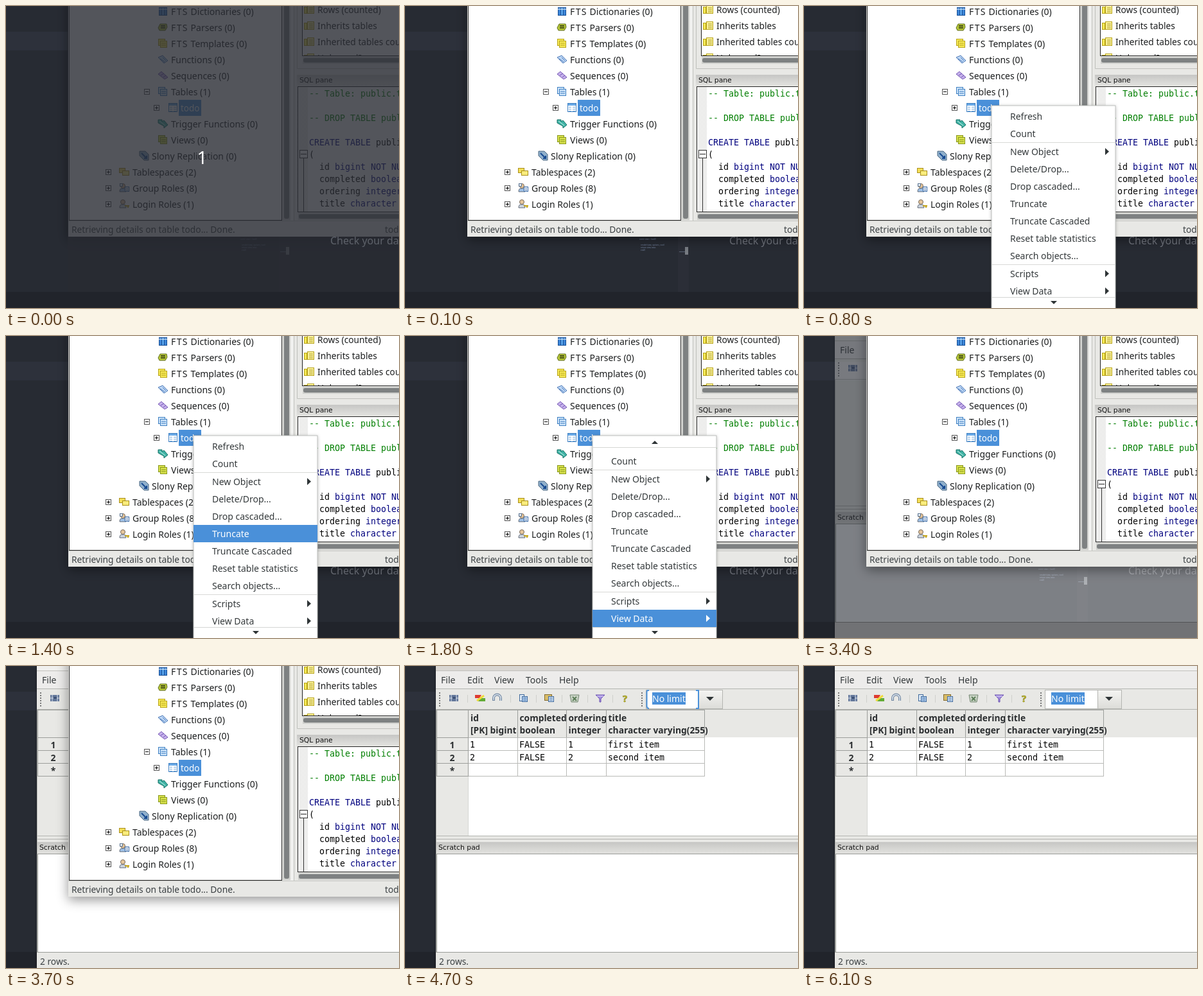
An HTML page that plays this animation: 612x470 px, repeating every 6200 ms.

```html
<!DOCTYPE html>
<html lang="en">
<head>
<meta charset="utf-8">
<title>Database table viewer</title>
<style>
html, body { margin: 0; width: 100%; height: 100%; overflow: hidden; background: #272a33; }
svg { display: block; width: 612px; height: 470px; }
text { font: 14px "Noto Sans", sans-serif; fill: #1c1e1f; white-space: pre; }
.menu { fill: #34393b; }
.bold { font-weight: 700; fill: #2b2e30; }
.mono { font: 13.3px "DejaVu Sans Mono", monospace; fill: #000; }
.label { font: 10.8px "DejaVu Sans", sans-serif; fill: #111; }
.status { font-size: 13.75px; fill: #3b4043; }
.fts { letter-spacing: 1.4px; }
.kw { fill: #00007f; }
.note { fill: #007f00; }
</style>
</head>
<body>
<svg id="stage" viewBox="0 0 612 470" xmlns="http://www.w3.org/2000/svg"></svg>
<script>
const LOOP = 6200;
const BLUE = '#4a90d9', PANEL = '#e8e8e5', LINE = '#b4b5b1';

const rect = (x, y, w, h, fill, extra = '') =>
  `<rect x="${x}" y="${y}" width="${w}" height="${h}" fill="${fill}" ${extra}/>`;
const box = (x, y, w, h, fill, stroke) =>
  rect(x + .5, y + .5, w - 1, h - 1, fill, `stroke="${stroke}"`);
const path = (d, fill, stroke = 'none', width = 1) =>
  `<path d="${d}" fill="${fill}" stroke="${stroke}" stroke-width="${width}"/>`;
const text = (x, y, str, cls = '', extra = '') =>
  `<text x="${x}" y="${y}" class="${cls}" ${extra}>${str}</text>`;
const group = (id, body, extra = '') => `<g id="${id}" ${extra}>${body}</g>`;
const at = (x, y, body) => `<g transform="translate(${x} ${y})">${body}</g>`;

// Small icons, drawn around their centre.
const pages = (fill, edge) => box(-7, -7, 11, 11, fill, edge) +
  box(-4, -4, 11, 11, fill, edge) + path('M-2 0H5M-2 3H5', 'none', edge);
const person = (shirt) => `<circle cx="-2" cy="-3" r="3.5" fill="#e6c69a" stroke="#776a5c"/>` +
  path('M-7 6Q-7 0-2 1Q3 0 3 6Z', shirt, '#606a78');
const icons = {
  books: box(-6, -6, 5, 13, '#3c86d8', '#174f96') + box(-2, -6, 5, 13, '#58a3ea', '#174f96') +
    box(2, -6, 5, 13, '#3c86d8', '#174f96') + path('M-6 -3H7', 'none', '#fff'),
  parser: path('M-7 1L-4 -5H6L7 0L4 5H-5Z', '#b8c83a', '#5c6a16') + path('M-3 -2H4M-3 1H4', 'none', '#444d14', 2),
  template: pages('#f7ea55', '#b7a31b'),
  func: path('M-7 -3L0 -6L8 2L2 6Z', '#bcd6f5', '#4b77b5') + path('M-4 -1L3 4M0 -3L5 2', 'none', '#4b77b5'),
  seq: path('M-7 -2L-2 -6L8 3L3 6Z', '#c6b2ec', '#7455b4') + path('M-3 0L2 -3M1 3L5 0', 'none', '#7455b4'),
  tables: pages('#cfe5fa', '#3e7fc1'),
  table: box(-7, -7, 14, 14, '#fff', '#3e7fc1') + rect(-6, -6, 12, 3, '#69a9e6') +
    path('M-5 -.5H-1M1 -.5H5M-5 2.5H-1M1 2.5H5M-5 5.5H-1M1 5.5H5', 'none', '#7eaedb'),
  trigger: path('M-7 -6H-1V-3L2 -5L8 2L2 7V4L-7 -1Z', '#3fb3a5', '#167166') + path('M-5 -4L4 3', 'none', '#c9f1ea'),
  views: pages('#d9e34d', '#87951c'),
  slony: path('M-7 -7H2L7 -2V7H0L-7 0Z', '#8fb0cc', '#4a6680') + path('M-4 -4L4 4M4 0V4H0', 'none', '#174a91', 2),
  folders: box(-8, -6, 10, 8, '#f4df58', '#a98f1c') + box(-3, -2, 11, 8, '#f9ec7c', '#a98f1c'),
  roles: person('#9ec1e8') + box(-7, -7, 5, 5, '#e9f0f8', '#58718f') + box(1, -2, 7, 8, '#fff', '#3567a5') +
    path('M3 1H6M3 3.500H6', 'none', '#3567a5'),
  login: person('#cfd6df') + path('M1 3H8M6 3V6', 'none', '#c3a41c', 2),
  list: box(-8, -5, 5, 11, '#f7ea55', '#b7a31b') + box(-3, -7, 11, 13, '#fbf29a', '#b7a31b') +
    path('M0 -3H6M0 0H6M0 3H6', 'none', '#a4921c'),
  save: rect(-7, -5, 14, 10, '#63779a') + path('M-4 -5V5M4 -5V5M-7 0H7', 'none', '#d5deea') + rect(-2, -2, 5, 3, '#3f5377'),
  reload: path('M-8 -5H2L-1 0H-8Z', '#dd3b31') + path('M8 5H-3L0 0H8Z', '#62ab35') + path('M-5 4L6 -4', 'none', '#f0dc39', 3),
  undo: path('M-6 4V0A5 5 0 0 1 5 0V4', 'none', '#7288a3', 4) + path('M-6 3V0A5 5 0 0 1 5 0V4', 'none', '#dfe7ef', 1.5),
  copy: box(-6, -6, 8, 11, '#dce9f6', '#40699b') + box(-2, -3, 9, 9, '#b1cff0', '#40699b') + path('M0 0H5M0 3H5', 'none', '#40699b'),
  paste: box(-7, -6, 12, 10, '#d9bd68', '#846b2e') + box(-1, -3, 9, 9, '#cfe2f6', '#40699b') + path('M1 0H6M1 3H6', 'none', '#40699b'),
  trash: path('M-7 -5H7L5 6H-5Z', '#c9d3c5', '#728670') + path('M-3 -2L3 4M3 -2L-3 4', 'none', '#5b7d58', 2),
  filter: path('M-7 -5H7L1 1V6H-1V1Z', '#a38ee0', '#6a52af') + path('M-5 -3H5', 'none', '#e3dbfb'),
  help: text(-4, 6, '?', '', 'style="font-weight:700;font-size:15px;fill:#c3bc20;stroke:#77731b;stroke-width:.5"')
};
const icon = (x, y, name) => at(x, y, icons[name]);
const toggle = (x, y, open) => box(x - 4, y - 4, 9, 9, '#fff', '#555') +
  path(`M${x - 2} ${y + .5}H${x + 3}` + (open ? '' : `M${x + .5} ${y - 2}V${y + 3}`), 'none', '#000');

function desktop() {
  const tiny = [[365, 364, 'const view = load()'], [367, 373, 'render(view, options, root)'],
    [367, 377, 'return view.rows'], [367, 381, 'end()']]
    .map(([x, y, s]) => text(x, y, s, '', 'style="font-size:3px;fill:#7887a5"')).join('');
  return rect(0, 0, 612, 470, '#272b33') + rect(0, 40, 97, 29, '#2d313b') +
    rect(425, 350, 17, 95, '#2b2e37') + rect(427, 382, 9, 1, '#596273') + rect(436, 375, 5, 12, '#777b82') +
    tiny + rect(0, 445, 612, 25, '#21242b');
}

function tree() {
  const rows = [
    [257, 244, 8, 'books', '<tspan class="fts">FTS</tspan> Dictionaries (0)'],
    [257, 244, 33, 'parser', '<tspan class="fts">FTS</tspan> Parsers (0)'],
    [257, 244, 58, 'template', '<tspan class="fts">FTS</tspan> Templates (0)'],
    [257, 244, 83, 'func', 'Functions (0)'], [257, 244, 108, 'seq', 'Sequences (0)'],
    [257, 244, 133, 'tables', 'Tables (1)'], [257, 244, 183, 'trigger', 'Trigger Functions (0)'],
    [257, 244, 208, 'views', 'Views (0)'], [227, 215, 233, 'slony', 'Slony Replication (0)'],
    [197, 184, 258, 'folders', 'Tablespaces (2)'], [197, 184, 283, 'roles', 'Group Roles (8)'],
    [197, 184, 308, 'login', 'Login Roles (1)']];
  return rows.map(([x, ix, y, name, s]) => icon(ix, y, name) + text(x, y + 5.5, s)).join('') +
    icon(260, 158, 'table') + rect(269, 146, 35, 25, BLUE) + text(272, 163.5, 'todo', '', 'style="fill:#fff;font-size:13.5px"') +
    toggle(219, 133, true) + [[234, 158], [159, 258], [159, 283], [159, 308]].map(p => toggle(...p)).join('');
}

function sqlPane() {
  const kw = s => `<tspan class="kw">${s}</tspan>`;
  const lines = [
    [472, 136, '-- Table: public.todo', 'note'], [472, 174, '-- DROP TABLE public.todo;', 'note'],
    [472, 212, kw('CREATE TABLE') + ' public.todo'], [472, 231, '('],
    [488, 250, 'id ' + kw('bigint NOT NULL')], [488, 269, 'completed ' + kw('boolean')],
    [488, 288, 'ordering ' + kw('integer')], [488, 307, 'title ' + kw('character varying')]];
  return rect(453, 107, 160, 17, 'url(#bar)') + text(457, 119, 'SQL pane', 'label') +
    box(454, 125, 170, 196, '#fff', '#222') + rect(456, 126, 14, 194, 'url(#hatch)') +
    path('M463.500 237V320', 'none', '#333') + box(457, 224, 13, 13, '#fff', '#333') + path('M459 230.500H468', 'none', '#222') +
    lines.map(([x, y, s, c = '']) => text(x, y + 4.500, s, 'mono ' + c)).join('') +
    rect(455, 322, 160, 11, '#cfd0cd') + rect(456, 324, 160, 7, '#7e8182', 'rx="3"');
}

function browser() {
  const list = ['Rows (counted)', 'Inherits tables', 'Inherited tables count', 'Unlogged?']
    .map((s, i) => icon(472, 6 + 25 * i, 'list') + text(485, 11 + 25 * i, s, '', 'style="font-size:13.75px"')).join('');
  return rect(97, -40, 560, 399, PANEL, 'filter="url(#shadow)"') +
    box(98, -5, 332, 339, '#fff', '#222') + tree() +
    rect(431, 0, 12, 333, '#cfd0cd') + rect(433, -5, 8, 336, '#7e8182', 'rx="3"') +
    rect(443, 0, 5, 335, '#f1f1ef') + path('M448.500 0V334M453.500 0V97.500H612', 'none', '#bfc0bc') +
    box(461, -5, 170, 83, '#fff', '#222') + `<g clip-path="url(#listClip)">${list}</g>` +
    rect(462, 79, 160, 11, '#cfd0cd') + rect(463, 81, 160, 7, '#7e8182', 'rx="3"') +
    sqlPane() + path('M97 334.500H612', 'none', '#c6c7c3') +
    text(102, 353, 'Retrieving details on table todo... Done.', 'status') + text(590, 353, 'todo', 'status');
}

function dataWindow() {
  const columns = [[98, 'id', '[PK] bigint', '1', '2'], [175, 'completed', 'boolean', 'FALSE', 'FALSE'],
    [251, 'ordering', 'integer', '1', '2'], [313, 'title', 'character varying(255)', 'first item', 'second item'], [466]];
  const grid = columns.slice(0, -1).map(([x, a, b, ...cells], i) => {
    const w = columns[i + 1][0] - x + 1, pad = x + (i === 0 ? 4 : 3.500);
    return box(x, 68, w, 44, PANEL, '#9c9e9b') + text(pad, 86, a, 'bold', 'style="font-size:13.8px"') +
      text(pad, 105, b, 'bold', 'style="font-size:13.8px"') +
      [0, 1, 2].map(r => box(x, 111 + 20 * r, w, 21, '#fff', '#b9bab7') +
        text(x + 3, 127 + 20 * r, cells[r] || '', 'mono')).join('');
  }).join('');
  const labels = ['1', '2', '*'].map((s, i) => box(49, 111 + 20 * i, 50, 21, PANEL, '#9c9e9b') +
    text(73.500, 127.500 + 20 * i, s, 'bold', 'text-anchor="middle"')).join('');
  const grip = x => path(`M${x} 41V63`, 'none', '#777', 2).replace('/>', ' stroke-dasharray="2 2"/>');
  const menus = [[56, 'File'], [97, 'Edit'], [139, 'View'], [188, 'Tools'], [240, 'Help']]
    .map(([x, s]) => text(x, 27, s, 'menu')).join('');
  const tools = [[76, 'save'], [117, 'reload'], [144, 'undo'], [184, 'copy'], [224, 'paste'],
    [264, 'trash'], [304, 'filter'], [343, 'help']].map(([x, n]) => icon(x, 50, n)).join('');
  const dividers = [97, 164, 204, 244, 284, 323].map(x => path(`M${x}.5 45V57`, 'none', '#cfd0cc')).join('');
  return rect(48, -40, 620, 560, PANEL, 'filter="url(#edge)"') +
    rect(48, 0, 564, 7, '#f0f0ee', 'id="titlebar"') + path('M48 7.500H612', 'none', '#c2c1bd') +
    rect(48, 8, 564, 27, '#edeceb') + menus + path('M48 35.500H612M48 67.500H612', 'none', LINE) +
    grip(54) + grip(369) + tools + dividers +
    box(375, 37, 120, 30, 'url(#button)', LINE) + rect(376, 38, 81, 28, '#fff') +
    rect(385, 41, 52, 19, BLUE) + text(385, 56, 'No limit', '', 'style="fill:#fff"') +
    path('M457.500 38V66', 'none', LINE) + path('M469 48H481L475 54Z', '#2e3436') +
    group('focus', path('M380 38H378Q376.500 38 376.500 41V62Q376.500 66 380 66M453 38H457V66H453', 'none', BLUE, 2)) +
    rect(98, 111, 514, 153, '#fff') + rect(49, 68, 49, 196, PANEL) + path('M98.500 171V264', 'none', '#d6d7d3') +
    group('rows', grid + labels + box(49, 68, 50, 44, PANEL, '#9c9e9b') + text(53, 465, '2 rows.', 'status')) +
    path('M48.500 68V446M48 264.500H612M48 269.500H612', 'none', LINE) +
    rect(49, 274, 563, 18, 'url(#bar)') + text(52, 286, 'Scratch pad', 'label') +
    box(49, 292, 580, 154, '#fff', '#999b97');
}

const ITEMS = ['Refresh', 'Count', 'New Object', 'Delete/Drop...', 'Drop cascaded...', 'Truncate', 'Truncate Cascaded',
  'Reset table statistics', 'Search objects...', 'Scripts', 'View Data', 'Reports'];
const PARENTS = [2, 9, 10, 11];

function contextMenu(scroll, hot) {
  const top = scroll ? 173 : 156;
  const items = ITEMS.map((s, i) => {
    const y = 158 + 27 * i + (i > 1) + (i > 8) - scroll, lit = i === hot, ink = lit ? '#fff' : '#2e3436';
    return (lit ? rect(292, y, 193, 27, BLUE) : '') +
      (i === 2 || i === 9 ? rect(292, y - 1, 193, 1, '#d8d9d7') : '') +
      text(321, y + 18.500, s, 'menu', lit ? 'style="fill:#fff"' : '') +
      (PARENTS.includes(i) ? path(`M469 ${y + 8}V${y + 19}L475 ${y + 13.500}Z`, ink) : '');
  }).join('');
  return rect(292, 155, 193, 330, '#fff', 'stroke="#b9bbb9" stroke-width="1" filter="url(#edge)"') +
    `<clipPath id="menuClip"><rect x="292" y="${top}" width="193" height="${453 - top}"/></clipPath>` +
    `<g clip-path="url(#menuClip)">${items}</g>` +
    (scroll ? path('M292 173.500H485', 'none', '#d5d6d4') + path('M384 168H394L389 163Z', '#2e3436') : '') +
    path('M292 453.500H485', 'none', '#d5d6d4') + path('M384 459H394L389 464Z', '#2e3436');
}

function submenu(lit) {
  return box(482, 358, 160, 140, '#fff', '#b9bbb9') + (lit ? rect(483, 415, 140, 27, BLUE) : '') +
    ['View Top 100 Rows', 'View Last 100 Rows', 'View All Rows', 'View Filtered Rows...']
      .map((s, i) => text(512.500, 380 + 27 * i, s, 'menu', lit && i === 2 ? 'style="fill:#fff"' : '')).join('');
}

// Start time, scroll offset and highlighted item.
const MENU_STEPS = [[800, 0, -1], [1000, 0, 0], [1100, 0, 1], [1300, 0, 2], [1400, 0, 5], [1500, 0, 7],
  [1600, 0, 9], [1800, 4, 10], [1900, 31, 11], [2100, 31, 10]];
const MENU_END = 3300;

const defs = `<defs>
  <linearGradient id="bar" x2="0" y2="1"><stop stop-color="#c6c6c4"/><stop offset="1" stop-color="#e2e2df"/></linearGradient>
  <linearGradient id="button" x2="0" y2="1"><stop stop-color="#f4f4f2"/><stop offset="1" stop-color="#dcdcd8"/></linearGradient>
  <pattern id="hatch" width="2" height="2" patternUnits="userSpaceOnUse"><rect width="2" height="2" fill="#fff"/>
    <path d="M0 0h1v1H0zM1 1h1v1H1z" fill="#dcdcda"/></pattern>
  <filter id="shadow" x="-20%" y="-20%" width="140%" height="140%">
    <feDropShadow dx="0" dy="5" stdDeviation="9" flood-opacity=".42"/></filter>
  <filter id="edge" x="-10%" y="-10%" width="120%" height="120%">
    <feDropShadow dx="0" dy="1" stdDeviation="2.500" flood-opacity=".25"/></filter>
  <clipPath id="listClip"><rect x="462" y="0" width="150" height="77"/></clipPath>
</defs>`;

const caption = text(505, 371, 'Check your data', '', 'style="font-size:16px;fill:#737780"');
document.getElementById('stage').innerHTML = defs + desktop() +
  group('caption', caption) + group('data', dataWindow()) + group('browser', browser()) +
  group('context', '') + group('sub', '') +
  group('countdown', rect(96, 0, 516, 445, '#282b33', 'opacity=".8"') +
    text(505, 371, 'Check your data', '', 'style="font-size:16px;fill:#5c6068"') +
    text(297.500, 246, '1', '', 'style="font-size:28px;fill:#fff"'));

const el = id => document.getElementById(id);
const show = (id, on) => el(id).style.display = on ? '' : 'none';
let menuKey = '';

function update(t) {
  const raised = t >= 4700, focused = raised && t < 6100;
  const menuOpen = t >= 800 && t < MENU_END;
  show('countdown', t < 100);
  show('browser', !raised);
  show('data', t >= 3400);
  el('data').setAttribute('opacity', t < 3500 ? .4 : t < 3600 ? .8 : 1);
  show('rows', t >= 3700);
  show('focus', focused);
  el('titlebar').setAttribute('fill', focused ? '#d9d6d1' : '#f0f0ee');
  show('context', menuOpen);
  show('sub', menuOpen && t >= 2300);
  if (!menuOpen) return;
  const [, scroll, hot] = MENU_STEPS.findLast(step => t >= step[0]);
  const key = [scroll, hot, t >= 2900].join();
  if (key === menuKey) return;
  menuKey = key;
  el('context').innerHTML = contextMenu(scroll, hot);
  el('sub').innerHTML = submenu(t >= 2900);
}

const start = performance.now();
function frame() {
  update((performance.now() - start) % LOOP);
  requestAnimationFrame(frame);
}
frame();
</script>
</body>
</html>
```
